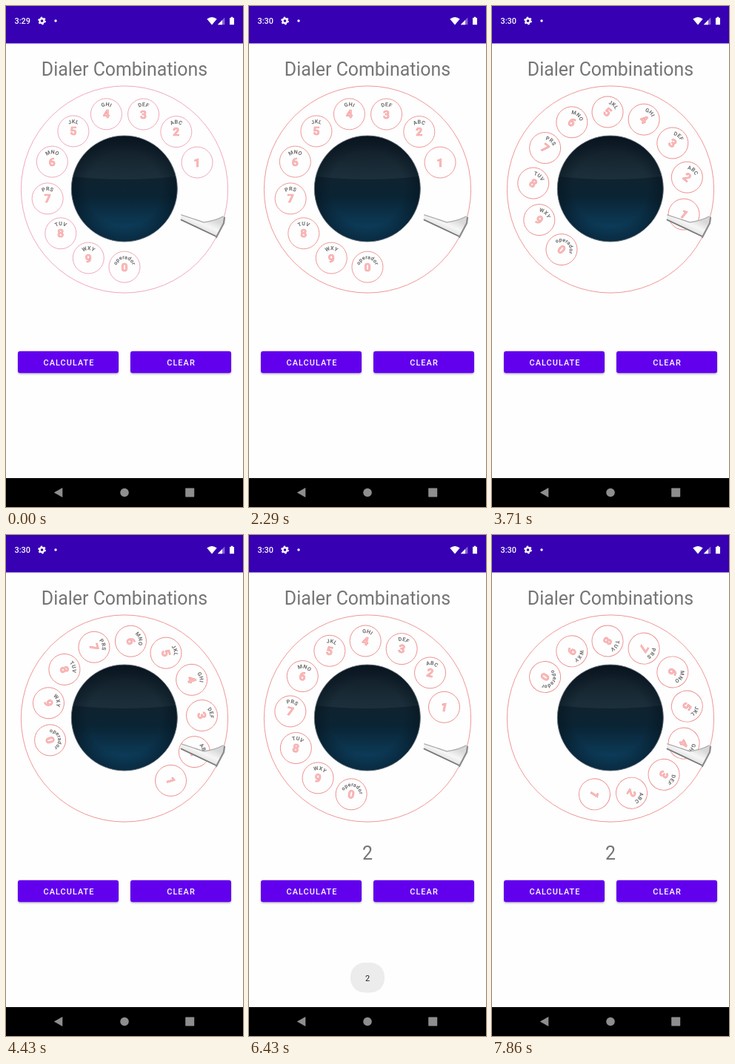
An HTML page that plays this animation: 320x676 px, repeating every 8 s.

```html
<!DOCTYPE html>
<html lang="en">
<head>
<meta charset="utf-8">
<title>Dialer Combinations</title>
<style>
  html, body { margin: 0; width: 100%; height: 100%; overflow: hidden; background: #fefefe; }
  svg { display: block; width: 100%; height: 100%; font-family: Roboto, sans-serif; }
  text { text-anchor: middle; }
  .ring { fill: none; stroke: #ee8c8c; stroke-width: .9; }
  .digit { font-size: 15.5px; font-weight: 700; fill: #fbc0c0; stroke: #f39a9a; stroke-width: .7; }
  .letters { font-size: 7.2px; font-weight: 700; fill: #6c6c6c; }
  .soft .ring { stroke: #f09fb2; }
  .big { font-size: 24.9px; fill: #757575; }
  .label { font-size: 10.9px; font-weight: 500; letter-spacing: 1.05px; fill: #fff; }
</style>
</head>
<body>
<svg id="stage" viewBox="0 0 320 676" preserveAspectRatio="none">
  <defs>
    <linearGradient id="glass" x1="0" y1="0" x2="0" y2="1">
      <stop offset="0" stop-color="#0b1722"/>
      <stop offset=".38" stop-color="#10222e"/>
      <stop offset=".58" stop-color="#0a2434"/>
      <stop offset=".85" stop-color="#0c3a57"/>
      <stop offset="1" stop-color="#0d405f"/>
    </linearGradient>
    <radialGradient id="rim">
      <stop offset=".7" stop-color="#04101a" stop-opacity="0"/>
      <stop offset="1" stop-color="#04101a" stop-opacity=".45"/>
    </radialGradient>
    <linearGradient id="gloss" x1="0" y1="0" x2="0" y2="1">
      <stop offset="0" stop-color="#fff" stop-opacity="0"/>
      <stop offset="1" stop-color="#9cc" stop-opacity=".08"/>
    </linearGradient>
    <linearGradient id="metal" gradientUnits="userSpaceOnUse" x1="268" y1="283" x2="259" y2="303">
      <stop offset="0" stop-color="#d8d8d8"/>
      <stop offset=".5" stop-color="#f6f6f6"/>
      <stop offset="1" stop-color="#dcdcdc"/>
    </linearGradient>
    <filter id="shade" x="-10%" y="-20%" width="120%" height="160%">
      <feDropShadow dx="0" dy="1.3" stdDeviation="1" flood-opacity=".3"/>
    </filter>
    <path id="arc" d="M-10.8 0A10.8 10.8 0 0 1 10.8 0"/>
  </defs>

  <rect width="320" height="676" fill="#fefefe"/>
  <rect width="320" height="50.5" fill="#3700b3"/>
  <g fill="#fff">
    <text id="clock" x="11.5" y="24.3" font-size="10.9" font-weight="500" style="text-anchor:start"></text>
    <circle cx="48.5" cy="20" r="3" fill="none" stroke="#fff" stroke-width="2.3"/>
    <circle cx="48.5" cy="20" r="4.6" fill="none" stroke="#fff" stroke-width="1.6" stroke-dasharray="2.4 2.417"/>
    <circle cx="67" cy="20" r="1.7"/>
    <path d="M271.3 17.5Q278 12.5 284.7 17.5L278 25.6Z"/>
    <path d="M285.8 25.3L295.3 15.5V25.3Z" opacity=".4"/>
    <path d="M285.8 25.3L292 19V25.3Z"/>
    <path d="M302 16H303.7V14.8H306.3V16H308V25.3H302Z"/>
  </g>

  <text class="big" x="160" y="93.5">Dialer Combinations</text>

  <circle class="ring" cx="160" cy="247.5" r="139.6"/>
  <g id="dial"></g>
  <circle cx="159.8" cy="246.5" r="71.5" fill="url(#glass)"/>
  <path d="M90 230A71.5 71.5 0 0 1 229.5 230Q160 238 90 230Z" fill="url(#gloss)"/>
  <circle cx="159.8" cy="246.5" r="71.5" fill="url(#rim)" stroke="#68727c" stroke-width=".9"/>

  <g stroke-linejoin="round" stroke-linecap="round">
    <path d="M236.5 281.5L268 292Q282 290 292.5 283.8L295.5 284.5L295 292L284 313L281.5 309.5L236 289.5Z" fill="url(#metal)"/>
    <path d="M236.8 281.8L267 291.8Q282 290 293 284" fill="none" stroke="#aaa" stroke-width="1.3"/>
    <path d="M236.5 288.5L283 310.5" fill="none" stroke="#777" stroke-width="1.8"/>
    <path d="M295 285.5L294 293L284 312" fill="none" stroke="#8b8b8b" stroke-width="2.2"/>
  </g>

  <text class="big" id="result" x="160" y="438.4">2</text>
  <g fill="#6200ee" filter="url(#shade)">
    <rect x="16" y="465.8" width="136" height="29.4" rx="3"/>
    <rect x="168" y="465.8" width="136" height="29.4" rx="3"/>
  </g>
  <text class="label" x="85" y="485">CALCULATE</text>
  <text class="label" x="236.5" y="485">CLEAR</text>

  <g id="toast">
    <rect x="137" y="577" width="46" height="40.5" rx="19" fill="#ececec"/>
    <text x="160" y="601.8" font-size="10.9" fill="#222">2</text>
  </g>

  <rect y="637" width="320" height="39" fill="#000"/>
  <g fill="#8e8e8e">
    <path d="M64.8 656.5L76.3 650V663Z"/>
    <circle cx="160" cy="656.5" r="5.8"/>
    <rect x="242.2" y="650.5" width="12" height="12" rx=".7"/>
  </g>
</svg>
<script>
const LOOP = 8000, FPS = 7;
const CENTER = [160, 247.5], ORBIT = 104.6;
const $ = id => document.getElementById(id);
const LETTERS = ['', 'ABC', 'DEF', 'GHI', 'JKL', 'MNO', 'PRS', 'TUV', 'WXY', 'operador'];

$('dial').innerHTML = LETTERS.map((letters, i) => {
  const angle = (-20.4 - i * 27.73) * Math.PI / 180;
  const x = CENTER[0] + ORBIT * Math.cos(angle);
  const y = CENTER[1] + ORBIT * Math.sin(angle);
  return `<g transform="translate(${x} ${y})">
    <circle class="ring" r="21"/>
    <text class="digit" y="5.5">${(i + 1) % 10}</text>
    <text class="letters"><textPath href="#arc" startOffset="50%">${letters}</textPath></text>
  </g>`;
}).join('');

const linear = x => x;
const easeInOut = x => (1 - Math.cos(Math.PI * x)) / 2;
const easeIn = x => x * x;
const easeOut = x => 1 - (1 - x) ** 2;

// Steps: time in ms, value, easing towards that value
const TURN = [
  [0, 0], [2860, 0], [3143, 11.5, easeIn], [4429, 73.7], [4571, 76, easeOut],
  [4640, 76], [5500, 0, easeInOut],
  [6250, 0], [6429, 12.1, easeIn], [7143, 84.9], [7857, 122.3], [8000, 127]
];
const TOAST = [[0, 0], [4680, 0], [5180, 1, easeOut], [6690, 1], [7190, 0, easeIn], [8000, 0]];

function valueAt(steps, t) {
  const i = Math.max(1, steps.findIndex(step => step[0] >= t));
  const [t0, v0] = steps[i - 1], [t1, v1, ease = linear] = steps[i];
  return v0 + (v1 - v0) * ease((t - t0) / (t1 - t0));
}

function draw(now) {
  const t = Math.floor((now % LOOP + 5) * FPS / 1000) % (LOOP * FPS / 1000) * 1000 / FPS;
  $('dial').setAttribute('transform', `rotate(${valueAt(TURN, t)} ${CENTER})`);
  $('toast').setAttribute('opacity', valueAt(TOAST, t));
  $('result').setAttribute('opacity', t > 4600 ? 1 : 0);
  $('clock').textContent = t < 570 ? '3:29' : '3:30';
  $('stage').classList.toggle('soft', t < 570);
}

const start = performance.now();
function tick() {
  draw(performance.now() - start);
  requestAnimationFrame(tick);
}
tick();
</script>
</body>
</html>
```
